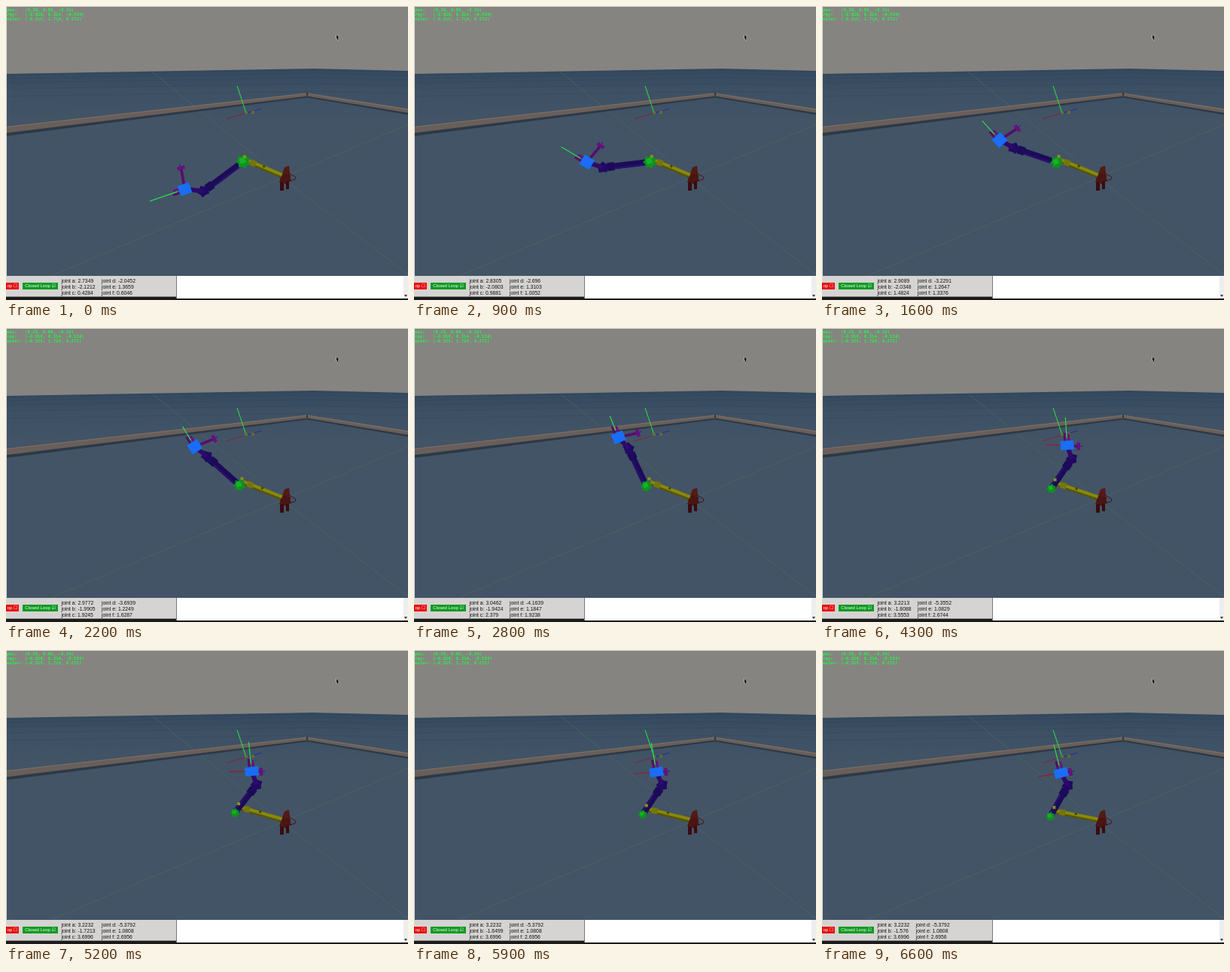
Write an HTML page with a canvas that moves like this. It is 534 by 390 pixels and loops after 6700 ms.

```html
<!DOCTYPE html>
<html lang="en">
<head>
<meta charset="utf-8">
<title>Robot arm, closed loop</title>
<style>
  html, body { margin: 0; width: 534px; height: 390px; overflow: hidden; background: #111; }
  body { position: relative; font-family: "Liberation Sans", Arial, sans-serif; }
  canvas, pre, div { position: absolute; margin: 0; white-space: pre; }
  canvas { left: 0; top: 0; }
  pre { left: 1px; top: 2px; font: bold 5.7px/6.1px "DejaVu Sans Mono", monospace; color: #22f548; }
  .button { top: 367px; height: 9px; font: 6px/9px "Liberation Sans", "DejaVu Sans", sans-serif; color: #fff; text-align: center; }
  .stop { left: 0; width: 17px; background: #e80c0c; }
  .loop { left: 22px; width: 47px; background: #0c9a20; }
  #joints { left: 73.5px; top: 361.3px; display: grid; grid-auto-flow: column;
    grid-template-rows: repeat(3, 7.7px); column-gap: 8.5px; font-size: 6.8px; line-height: 7.7px; color: #111; }
</style>
</head>
<body>
<canvas id="stage" width="534" height="390"></canvas>
<pre>pos:   (0.29, 0.05, -0.34)
rpy:   (-0.010, 0.314, -0.534)
euler: (-0.515, 1.719, 0.272)</pre>
<div class="button stop">op ☐</div>
<div class="button loop">Closed Loop ☑</div>
<div id="joints"></div>
<script>
const LOOP = 6700, STEP = 100, DEG = Math.PI / 180;
const ctx = document.getElementById('stage').getContext('2d');

// each joint eases once from its first to its last angle
const joints = {
  a: { from: 2.7349, to: 3.2232, end: 4316, power: 1.04 },
  b: { from: -2.1212, to: -1.576, end: 6600, power: 1.3 },
  c: { from: 0.4284, to: 3.6996, end: 4480, power: 1.1 },
  d: { from: -2.0452, to: -5.3792, end: 4330, power: 1.04 },
  e: { from: 1.3659, to: 1.0808, end: 4330, power: 1.04 },
  f: { from: 0.6046, to: 2.6956, end: 4342, power: 1.05 }
};

const progress = (j, t) => Math.min(1, t / j.end) ** j.power;
const angleOf = (j, t) => j.from + (j.to - j.from) * progress(j, t);
const turned = (j, t) => (angleOf(j, t) - j.from) / DEG;
const reach = ([x, y], deg, r) => [x + r * Math.cos(deg * DEG), y + r * Math.sin(deg * DEG)];

function poseAt(t) {
  const s = progress(joints.c, t), root = Math.sqrt(s);
  const lift = turned(joints.b, t), bend = turned(joints.c, t);
  const elbow = reach([370, 228], 201.8 - lift / 2, 59 + 8 * progress(joints.a, t));
  const wrist = reach(elbow, 143.3 + bend - lift, 66 - 19 * s);
  const tool = reach(wrist, 186 + 87 * s - lift, 25 - 6 * root);
  const spin = 161 + 126 * root - lift;
  return {
    s, elbow, wrist, tool,
    upper: [elbow[0] + 5 + 3 * s, elbow[1] - 6 * s],
    green: reach(tool, spin, 49 - 62 * s + 52 * s * s),
    prong: reach(tool, spin + 99, 28 - 16 * s ** 4),
    red: reach(tool, spin - 85, 30 * s * s)
  };
}

function line(color, width, ...pts) {
  ctx.strokeStyle = color;
  ctx.lineWidth = width;
  ctx.beginPath();
  pts.forEach(p => ctx.lineTo(...p));
  ctx.stroke();
}

function poly(color, ...pts) {
  ctx.fillStyle = color;
  ctx.beginPath();
  pts.forEach(p => ctx.lineTo(...p));
  ctx.fill();
}

function rect(color, x, y, w, h) {
  ctx.fillStyle = color;
  ctx.fillRect(x, y, w, h);
}

// lump with small teeth around its edge
function lump(color, [x, y], rx, ry, teeth) {
  const pts = Array.from({ length: teeth * 2 }, (_, i) => {
    const r = i % 2 ? 0.72 : 1, a = i * Math.PI / teeth + 0.4;
    return [x + rx * r * Math.cos(a), y + ry * r * Math.sin(a)];
  });
  poly(color, ...pts);
}

// run a drawing with x pointing from one point to another
function along(from, to, draw) {
  const dx = to[0] - from[0], dy = to[1] - from[1];
  ctx.save();
  ctx.translate(...from);
  ctx.rotate(Math.atan2(dy, dx));
  draw(Math.hypot(dx, dy));
  ctx.restore();
}

// strip following the room's back walls, between two offsets from the top edge
function wall(color, top, bottom, slack) {
  poly(color, [0, 160 + top * slack], [400, 115.5 + top], [534, 136.5 + top * 1.3],
    [534, 136.5 + bottom * 1.3], [400, 115.5 + bottom], [0, 160 + bottom * slack]);
}

function drawRoom() {
  rect('#868480', 0, 0, 534, 358);
  const floor = ctx.createLinearGradient(0, 84, 0, 150);
  floor.addColorStop(0, '#34495f');
  floor.addColorStop(0.4, '#3d5064');
  floor.addColorStop(1, '#425466');
  poly(floor, [0, 90], [408, 83], [534, 86], [534, 358], [0, 358]);
  for (let i = 0; i < 5; i++) {
    const y = 92 + i * (i + 3);
    line('rgba(38,56,78,.22)', 1, [0, y], [408, y - 7], [534, y - 4]);
  }
  line('#52665f', 0.7, [195, 88], [367, 228], [534, 356]);
  line('#52665f', 0.7, [534, 157], [367, 228], [60, 358]);
  wall('#2c3947', 3, 6, 2.1);
  wall('#695e59', 0, 4, 2.1);
  wall('#7c7068', 0, 1, 1);
  rect('#3b332f', 399, 115, 2, 4);
  rect('#dcdcda', 0, 0, 534, 1);
  rect('#dcdcda', 0, 0, 1, 358);
}

function drawMarker() {
  const origin = [319, 142];
  line('#86233a', 1, [293, 150], origin);
  line('#2929a0', 1.2, origin, [339, 136.5]);
  line('#30d048', 1.1, [307, 106], origin);
  rect('#5f7426', 317, 140, 4, 3);
  rect('#66682c', 326, 139, 4, 4);
}

function drawBase() {
  poly('#541a14', [370, 214], [376, 212], [378, 232], [363, 234]);
  lump('#4a1513', [371, 229], 9, 8, 6);
  rect('#390b10', 364, 234, 5, 11);
  rect('#390b10', 372, 233, 4, 10);
  line('#4b1218', 1, [375, 221], [385, 227], [384, 230], [374, 233]);
}

function drawArm(t) {
  const { s, elbow, wrist, tool, upper, green, prong, red } = poseAt(t);
  along(upper, [368, 226], len => {
    rect('#565504', -2, -3.5, len, 6.5);
    rect('#89880c', -2, -3.5, len, 4);
    rect('#74750c', 4, -5, 8, 8);
    rect('#454604', len * 0.42, -4, 3, 3);
  });

  along(elbow, wrist, len => {
    rect('#1c0b58', 0, -4, len, 8);
    rect('#27106a', 0, -4, len, 2.5);
    rect('#1c0b58', len - 15, -5.5, 9, 11);
    lump('#200a62', [len, 0], 9, 8, 5);
  });

  const size = 9 - 3.5 * s;
  lump('#0d931d', elbow, size + 1, size + 1, 7);
  lump('#16b22a', [elbow[0] - 1, elbow[1] - 1], size * 0.6, size * 0.6, 4);
  rect('#87911a', upper[0] - 5, upper[1] - 8, 4, 4);

  line('#2d0a6c', 6, wrist, tool);
  along(tool, prong, len => {
    line('#2d22a0', 1.2, [len, 0], [len + 6, -1]);
    line('#570b70', 3.5, [0, 0], [len, 0]);
    line('#67107f', 4.5, [len, -5], [len + 1, 5]);
  });
  line('#a01535', 1.2, tool, red);
  along(tool, green, len => {
    line('#5b0a68', 3, [0, -2.6], [17, -2.6]);
    line('#6b1080', 3, [0, 2.6], [15, 2.6]);
    line('#2bdc4a', 1.2, [10, 0], [len, 0]);
    const deep = 16 - 4 * s, wide = 14 + 4 * s;
    rect('#196ef5', -deep / 2, -wide / 2, deep, wide);
  });
}

function drawPanel() {
  rect('#1b1b1b', 0, 358, 534, 32);
  rect('#d5d4d3', 0, 358, 226, 28);
  rect('#77777a', 226, 358, 1, 30);
  rect('#8c8c8c', 0, 385, 226, 1);
  rect('#fff', 227, 358, 301, 30);
  rect('#eee', 528, 358, 6, 30);
  poly('#333', [529, 383], [533, 383], [531, 386]);
}

function drawCursor() {
  const arrow = [[439, 38], [442.5, 42], [441, 42.5], [441.8, 45], [440.6, 45.3], [439.8, 43], [439, 44], [439, 38]];
  line('#ddd', 1, ...arrow);
  poly('#111', ...arrow);
}

const labels = Object.keys(joints).map(name => {
  const el = document.createElement('span');
  document.getElementById('joints').append(el);
  return { name, el };
});

function showJoints(t) {
  for (const { name, el } of labels) el.textContent = `joint ${name}: ${+angleOf(joints[name], t).toFixed(4)}`;
}

const start = performance.now();
function tick() {
  const t = Math.floor((performance.now() - start) % LOOP / STEP) * STEP;
  drawRoom();
  drawMarker();
  drawBase();
  drawArm(t);
  drawPanel();
  drawCursor();
  showJoints(t);
  requestAnimationFrame(tick);
}
tick();
</script>
</body>
</html>
```
